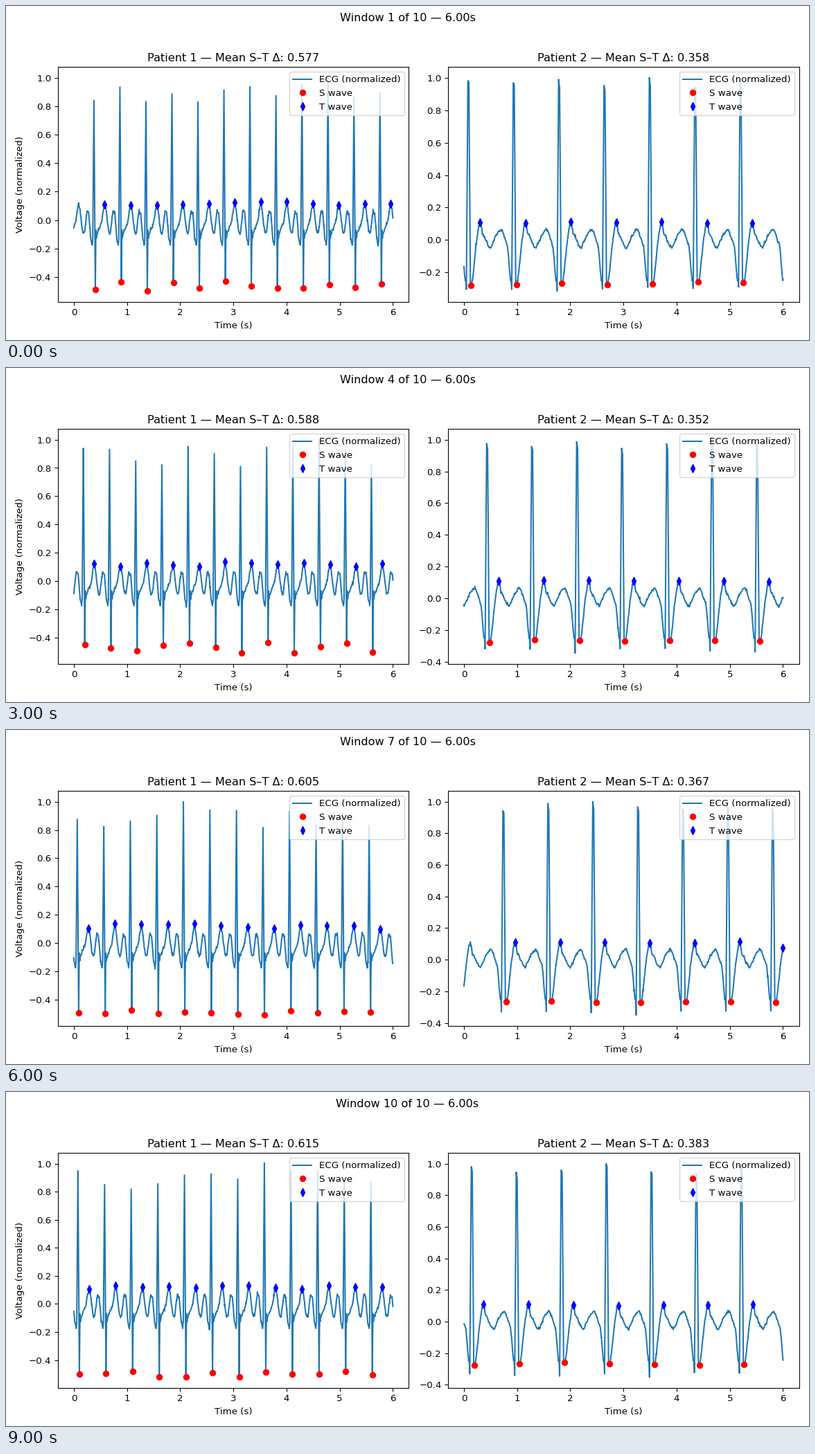
Write a matplotlib script that moves like this. It is 1159 px wide and 483 px high and loops after 10000 ms.

```python
import math

import numpy as np
import matplotlib.pyplot as plt
from matplotlib.animation import FuncAnimation

W, H, DPI = 1159, 483, 96.6
WINDOWS, SPAN = 10, 6.0

plt.rcParams["font.family"] = "DejaVu Sans"

# One beat as (ms from the S wave, level); letters take the beat's own peaks.
NARROW = [
    (-239, -.075), (-224, -.09), (-204, -.085), (-169, .03), (-156, .065),
    (-124, .05), (-104, -.04), (-86, -.13), (-58, -.175), (-48, -.13),
    (-26, "R"), (0, "S"), (11, -.07), (21, -.125), (32, -.095), (58, -.07),
    (100, -.03), (125, 0), (150, .07), (177, "T"), (200, .08), (225, -.005),
]
WIDE = [
    (-573, -.005), (-521, -.04), (-488, -.05), (-417, 0), (-391, .025),
    (-313, .06), (-286, .065), (-260, .05), (-215, .005), (-169, -.04),
    (-150, -.1), (-130, -.19), (-111, -.25), (-101, -.24), (-91, "Q"),
    (-62, "R"), (-44, "r"), (-16, -.26), (0, "S"), (20, -.25), (39, -.2),
    (91, -.03), (143, .09), (167, "T"), (185, .09), (206, .04), (247, .02),
]

# Title readings of both patients and the deepest S wave, per window.
MEAN1 = [.577, .617, .634, .588, .542, .574, .605, .604, .602, .615]
MEAN2 = [.358, .375, .368, .352, .335, .351, .367, .375, .383, .383]
FLOOR1 = [-.498, -.532, -.532, -.51, -.491, -.5, -.509, -.502, -.494, -.522]


def drift(w, *values):
    """Slow change over the recording, through a few key windows."""
    return np.interp(w, [0, 2, 4, 6, 8, 9], values)


def trace(shape, onset, period, nominal, peaks, noise, rng):
    """Return the curve and the S and T marker times of one window."""
    scale = period / nominal / 1000
    offset = {level: ms * scale for ms, level in shape
              if isinstance(level, str)}
    t, v, s_marks, t_marks = [], [], [], []
    for i in range(len(peaks["S"])):
        s_time = onset + (i - 1) * period
        for ms, level in shape:
            t.append(s_time + ms * scale)
            v.append(peaks[level][i] if isinstance(level, str) else level)
        if 0 <= s_time + offset["R"] <= SPAN:
            s_marks.append(min(s_time, SPAN))
            if s_time < SPAN:
                t_marks.append(min(s_time + offset["T"], SPAN))

    # Fine jitter between the key points, which stay exact.
    fine = np.linspace(0, SPAN, 500)
    x = np.concatenate([fine, t])
    y = np.concatenate([np.interp(fine, t, v) + rng.normal(0, noise, 500), v])
    order = np.argsort(x)
    x, y = x[order], y[order]
    inside = (x >= 0) & (x <= SPAN)
    return x[inside], y[inside], np.array(s_marks), np.array(t_marks)


def beat_levels(rng, count, low, high, extreme=None):
    """Random levels, with one well visible beat at the extreme."""
    levels = rng.uniform(low, high, count)
    if extreme is not None:
        levels[rng.integers(2, count - 4)] = extreme
    return levels


def narrow_window(w):
    rng = np.random.default_rng(10 + w)
    onset = drift(w, .404, .273, .137, .091, .078, .104)
    period = drift(w, .489, .4884, .4966, .499, .5038, .5008)
    count = math.ceil(SPAN / period) + 3
    low = FLOOR1[w]
    centre = .115 - MEAN1[w]
    peaks = {"R": beat_levels(rng, count, .81, .96, 1),
             "S": beat_levels(rng, count, low, 2 * centre - low, low),
             "T": beat_levels(rng, count, .1, .138)}
    curve = trace(NARROW, onset, period, .489, peaks, .007, rng)
    return curve, low, MEAN1[w]


def wide_window(w):
    rng = np.random.default_rng(50 + w)
    period = drift(w, .853, .8481, .8444, .8444, .841, .845)
    onset = drift(w, .137, .953, 1.717, 2.484, 3.213, 3.58) % period
    count = math.ceil(SPAN / period) + 3
    low = -.352 + .0375 * math.exp(-w / 1.8)
    top = beat_levels(rng, count, .94, .99, 1)
    peaks = {"R": top, "r": top - rng.uniform(.01, .05, count),
             "Q": beat_levels(rng, count, low + .005, low + .03, low),
             "S": beat_levels(rng, count, -.28, -.257),
             "T": beat_levels(rng, count, .1, .115)}
    curve = trace(WIDE, onset, period, .847, peaks, .005, rng)
    return curve, low, MEAN2[w]


def make_panel(ax):
    ax.set_xlim(-.05 * SPAN, 1.05 * SPAN)
    ax.set_xlabel("Time (s)")
    lines = (ax.plot([], [], label="ECG (normalized)")
             + ax.plot([], [], "ro", label="S wave")
             + ax.plot([], [], "bd", label="T wave"))
    ax.legend(loc="upper right")
    return ax, lines


fig, axes = plt.subplots(1, 2, dpi=DPI, facecolor="white",
                         figsize=((W + .01) / DPI, (H + .01) / DPI))
heading = fig.suptitle("")
axes[0].set_ylabel("Voltage (normalized)")
panels = [make_panel(ax) for ax in axes]
windows = [(narrow_window(w), wide_window(w)) for w in range(WINDOWS)]


def update(w):
    heading.set_text(f"Window {w + 1} of {WINDOWS} — {SPAN:.2f}s")
    for n, ((ax, lines), (curve, low, mean)) in enumerate(
            zip(panels, windows[w]), 1):
        x, y, s_marks, t_marks = curve
        lines[0].set_data(x, y)
        lines[1].set_data(s_marks, np.interp(s_marks, x, y))
        lines[2].set_data(t_marks, np.interp(t_marks, x, y))
        pad = .05 * (1 - low)
        ax.set_ylim(low - pad, 1 + pad)
        ax.set_title(f"Patient {n} — Mean S–T Δ: {mean:.3f}")
    return []


update(0)
fig.tight_layout(rect=[0, 0, 1, .95])
anim = FuncAnimation(fig, update, frames=WINDOWS, interval=1000,
                     repeat=True, repeat_delay=0)
plt.show()
```
